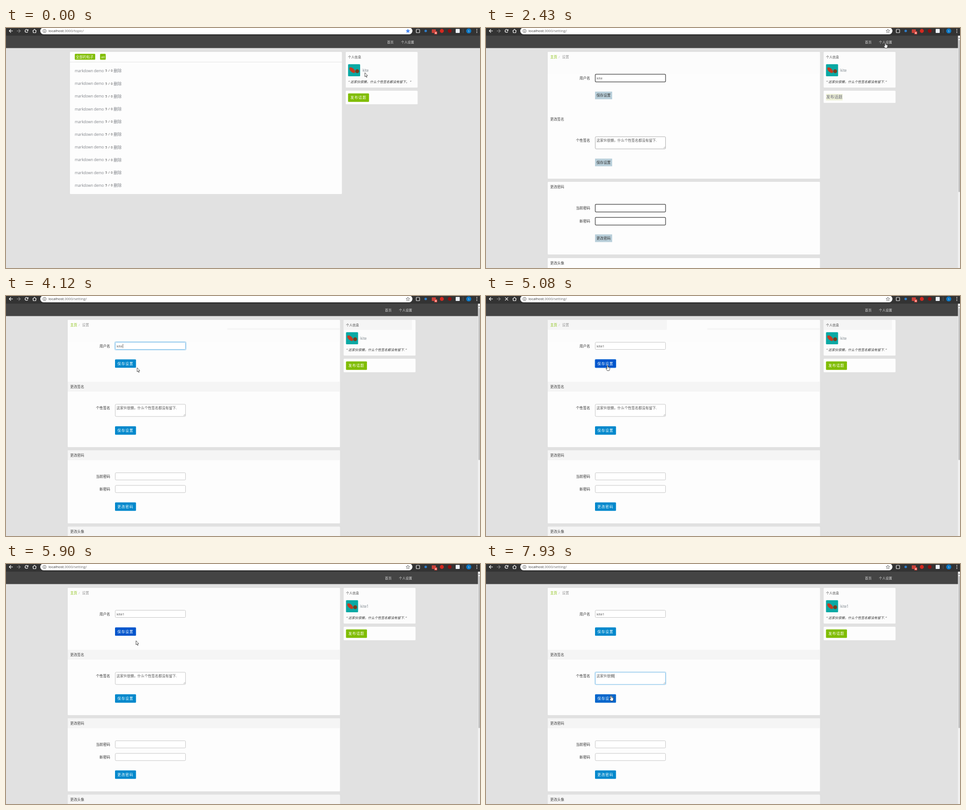
Animation of 1052x532 px, one loop 8000 ms. Source, as an HTML page with a canvas:

```html
<!DOCTYPE html>
<html lang="zh-CN">
<head>
<meta charset="utf-8">
<title>Forum settings</title>
<style>
html, body { margin: 0; width: 100%; height: 100%; overflow: hidden; background: #e1e1e1; }
canvas { display: block; width: 1052px; height: 532px; }
</style>
</head>
<body>
<canvas id="stage"></canvas>
<script>
const W = 1052, H = 532, LOOP = 8000;
const FONT = '"Open Sans", "Noto Sans", "Noto Sans CJK SC", "Noto Sans CJK", sans-serif';
const BLUE = '#0088cc', HOVER = '#0466cc', ACTIVE = '#0055cc', GREEN = '#80bd01';
const HEAD = '#f5f5f5', OFF = '#fcfcfc';
const SIGN = '这家伙很懒，什么个性签名都没有留下';

const canvas = document.getElementById('stage');
const dpr = window.devicePixelRatio || 1;
canvas.width = W * dpr;
canvas.height = H * dpr;
const g = canvas.getContext('2d');

// Pointer: start time, shape, position of the tip
const POINTER = [
  [0, 'arrow', 796.5, 99], [780, 'arrow', 814, 92], [930, 'arrow', 841, 78],
  [1050, 'arrow', 868, 65], [1200, 'arrow', 880, 53], [1320, 'hand', 884, 36],
  [1440, 'hand', 885, 31], [1720, 'hand', 886, 32], [2670, 'arrow', 868, 54],
  [2790, 'arrow', 800, 66], [2910, 'arrow', 741.5, 71.5], [3060, 'arrow', 640, 85],
  [3180, 'arrow', 500, 101], [3300, 'arrow', 405, 115], [3420, 'arrow', 306, 124],
  [3850, 'arrow', 291, 159], [4270, 'arrow', 288, 156], [4420, 'hand', 276, 150],
  [4540, 'hand', 269.5, 153], [5900, 'arrow', 288.5, 170], [6050, 'arrow', 289, 215],
  [6170, 'beam', 290, 259], [6450, 'beam', 340, 256], [6570, 'beam', 379, 250],
  [6720, 'beam', 379, 249], [6840, 'beam', 322, 249], [6990, 'beam', 309, 249],
  [7110, 'beam', 296, 249], [7230, 'beam', 280, 249], [7660, 'beam', 281, 268],
  [7780, 'hand', 277, 287], [7930, 'hand', 277.5, 291]
];

function rect(x, y, x2, y2, fill, r = 0) {
  g.fillStyle = fill;
  g.beginPath();
  g.roundRect(x, y, x2 - x, y2 - y, r);
  g.fill();
}

function frame(x, y, x2, y2, color, width = 1, r = 2) {
  g.strokeStyle = color;
  g.lineWidth = width;
  g.beginPath();
  g.roundRect(x + .5, y + .5, x2 - x - 1, y2 - y - 1, r);
  g.stroke();
}

function disc(x, y, r, fill) {
  g.fillStyle = fill;
  g.beginPath();
  g.arc(x, y, r, 0, 7);
  g.fill();
}

function line(points, color, width = 1, fill) {
  g.beginPath();
  points.forEach(([x, y], i) => i ? g.lineTo(x, y) : g.moveTo(x, y));
  if (fill) {
    g.closePath();
    g.fillStyle = fill;
    g.fill();
  }
  g.strokeStyle = color;
  g.lineWidth = width;
  g.stroke();
}

function text(s, x, y, size, color, { style = '', align = 'left', gap = 0 } = {}) {
  g.font = `${style} ${size}px ${FONT}`;
  g.letterSpacing = gap + 'px';
  g.textAlign = align;
  g.fillStyle = color;
  g.fillText(s, x, y);
}

function button(s, x, y, color) {
  rect(x, y, x + 46.5, y + 18.7, color, 1.5);
  text(s, x + 5.3, y + 12.4, 7.8, '#fff', { style: '500', gap: 1.1 });
}

function star(x, y, filled) {
  const pts = [];
  for (let i = 0; i <= 10; i++) {
    const r = i % 2 ? 1.9 : 4.4, a = i * Math.PI / 5 - Math.PI / 2;
    pts.push([x + r * Math.cos(a), y + r * Math.sin(a)]);
  }
  line(pts, filled ? '#4285f4' : '#555', .8, filled ? '#4285f4' : '#fff');
}

function browser(t) {
  rect(0, 0, W, 17, '#333');
  rect(76, -1, 902, 14, '#fff', 7.5);
  for (const [x, dir, color] of [[11, -1, '#fff'], [28, 1, '#888']]) {
    line([[x - 4 * dir, 6.5], [x + 4 * dir, 6.5]], color, 1.2);
    line([[x, 2.8], [x + 3.8 * dir, 6.5], [x, 10.2]], color, 1.2);
  }
  const loading = t >= 1720 && t < 2430 || t >= 4690 && t < 5330;
  if (loading) {
    line([[42.5, 3.2], [49, 9.8]], '#fff', 1.2);
    line([[49, 3.2], [42.5, 9.8]], '#fff', 1.2);
  } else {
    g.strokeStyle = '#fff';
    g.lineWidth = 1.3;
    g.beginPath();
    g.arc(45.6, 6.5, 3.2, .4, 5.4);
    g.stroke();
    line([[49.3, 2.8], [49.3, 6], [46.2, 6]], '#fff', .5, '#fff');
  }
  line([[59, 7], [63.3, 2.8], [67.6, 7]], '#fff', 1.2);
  line([[60.4, 6.5], [60.4, 10.5], [66.2, 10.5], [66.2, 6.5]], '#fff', 1.2);

  g.strokeStyle = '#555';
  g.lineWidth = .9;
  g.beginPath();
  g.arc(85.5, 6.6, 3.6, 0, 7);
  g.stroke();
  rect(85, 6, 86, 8.8, '#555');
  rect(85, 4.3, 86, 5.3, '#555');
  text('localhost', 94.3, 9.3, 8, '#333');
  const hostEnd = 94.3 + g.measureText('localhost').width;
  text(':3000/' + (t < 2030 ? 'topic/' : 'setting/'), hostEnd, 9.3, 8, '#6a6a6a');
  star(892, 6.8, t < 2030);

  frame(910, 2.5, 918.5, 11, '#eee', 1.2, 1);
  disc(931.5, 6.5, 2.8, '#2f7bc4');
  rect(945, 3, 954, 11, '#c8413a', .5);
  rect(950.5, 7.5, 957, 14, '#e04b42', 1);
  text('4', 953.8, 13.2, 6, '#fff', { style: 'bold', align: 'center' });
  disc(967.3, 6.5, 4.4, '#d5281f');
  disc(984.8, 6.5, 4.2, '#8b1010');
  rect(998, 2, 1007, 11, '#edf2fb', 1);
  rect(1014, 2, 1014.8, 11, '#666');
  disc(1027, 6.5, 5.6, '#0c78c6');
  text('S', 1027, 8.5, 5, '#fff', { align: 'center' });
  for (const y of [3.3, 6.6, 9.9]) disc(1045, y, .95, '#fff');
}

function nav(dx, hover) {
  rect(0, 16.5, W, 44.5, '#444');
  text('首页', 845.7 + dx, 33.6, 7.3, '#ddd');
  text('个人设置', 876.7 + dx, 33.6, 7.3, hover ? '#fff' : '#ddd');
}

function sidebar(dx, name, ending, raw) {
  g.save();
  g.translate(dx, 0);
  rect(754, 53, 913.5, 132, OFF, 1.5);
  rect(754, 139, 913.5, raw ? 166 : 169, '#fdfdfd', 1.5);
  g.restore();
  return () => {
    g.save();
    g.translate(dx, 0);
    text('个人信息', 759, 66.6, 7.3, '#444');
    rect(759.2, 80.3, 786, 107, '#0ba9a4', 1.5);
    g.fillStyle = '#c63a20';
    g.beginPath();
    g.ellipse(768.5, 93.5, 8, 4.2, .75, 0, 7);
    g.fill();
    disc(779.5, 95.8, 4.3, '#73401f');
    text(name, 791.2, 96.8, 8.1, '#778087');
    text(`“ ${SIGN}${ending} ”`, 759.8, 122.4, 7.25, '#333', { style: 'italic' });
    if (raw) {
      rect(759.3, 146, 796, 160.5, '#eef1d8');
      text('发布话题', 759.5, 156.4, 9, '#667');
    } else {
      button('发布话题', 759.2, 145, GREEN);
    }
    g.restore();
  };
}

function topicPage(t) {
  nav(0, t >= 1320);
  rect(142, 53, 745.5, 368, '#fdfdfd', 1.5);
  rect(142, 75, 745.5, 76, '#e2e2e2');
  rect(152.7, 57.3, 198, 70.3, GREEN, 1.5);
  rect(208.8, 57.3, 221.3, 70.3, GREEN, 1.5);
  text('全部的帖子', 155, 66.9, 7.8, '#fff');
  text('all', 211, 66.7, 7.8, '#fff');
  for (let i = 0; i < 10; i++) {
    const y = 98 + i * 28.2;
    text('markdown demo', 152.8, y, 8.1, '#7f8288');
    text('5 / 0', 220.3, y - .7, 7.6, '#444', { gap: .3 });
    text('删除', 238.8, y + .3, 9, '#7f8288');
  }
  const details = sidebar(0, 'kite', '。', false);
  if (t >= 1050) rect(837, 65, 886.5, 75, HEAD);
  if (t >= 1200) rect(867, 53, 886.5, 75, HEAD);
  details();
}

function field(y, raw, focus, glow) {
  if (glow) frame(241, y - 1, 400, y + 18, '#c5e2f5', 2);
  rect(242, y, 399, y + (raw ? 18 : 17), '#fff', 2);
  frame(242, y, 399, y + (raw ? 18 : 17), raw ? '#555' : focus ? '#6fb6e6' : '#c4c4c4', raw ? 1.5 : 1);
}

function signature(t, raw) {
  const y = raw ? 240.5 : 239.5, base = y + 11.3;
  const focus = t >= 6720;
  if (t >= 6840) frame(241, y - 1, 400, y + 28.5, '#d7ebf8', 1.5);
  rect(242, y, 399, y + 28, '#fff', 2);
  frame(242, y, 399, y + 28, focus ? '#6fb6e6' : raw ? '#aaa' : '#c4c4c4');
  line([[394, y + 26], [397.5, y + 22.5]], '#888', .7);
  line([[396, y + 26], [397.5, y + 24.5]], '#888', .7);
  const s = t < 7660 ? SIGN + '.' : SIGN.slice(0, 5);
  text(s, 245.3, base, 7.75, '#555');
  const width = g.measureText(s).width;
  if (t >= 6840 && t < 7660) {
    const left = t < 6990 ? 323 : t < 7110 ? 307.3 : t < 7230 ? 299.6 : 284.1;
    const right = 245.3 + width;
    g.save();
    g.beginPath();
    g.rect(left, y + 4, right - left, 10);
    g.clip();
    rect(left, y + 4, right, y + 14, '#3390ff');
    text(s, 245.3, base, 7.75, '#fff');
    g.restore();
  } else if (focus) {
    rect(245.3 + width, y + 4, 246 + width, y + 13.5, '#333');
  }
}

function saveColor(t) {
  if (t >= 4420 && t < 4690) return HOVER;
  if (t >= 4690 && t < 6050) return ACTIVE;
  return t < 6170 && t >= 6050 ? HOVER : BLUE;
}

function settingsButton(s, y, raw, color) {
  if (raw) {
    rect(242, y, 280, y + 17, '#b9cfda');
    text(s, 245.3, y + 11.2, 7.8, '#333');
  } else {
    button(s, 242, y, color);
  }
}

function settingsPage(t) {
  const raw = t < 2550 || t >= 5330 && t < 5600;
  const saved = t >= 5330;
  const label = (s, y) => text(s, 231, y, 7.8, '#333', { align: 'right' });
  const title = (s, y) => text(s, 142.4, y, 7.8, '#444');
  const d = raw ? -1 : 0;

  nav(-4.6, false);
  rect(1047.5, 17, W, H, '#f1f1f1');
  rect(1048.5, 27, 1052, 363.5, '#c1c1c1');
  line([[1048.8, 23.5], [1050, 21.8], [1051.2, 23.5]], '#666', .5, '#666');

  rect(137, 53, 741.2, 335 + d, '#fdfdfd', 1.5);
  rect(137, 53, 741.2, 101, OFF, 1.5);
  rect(137, 342 + d, 741.2, 504 + 2 * d, '#fdfdfd', 1.5);
  rect(137, 511.5 + 1.5 * d, 741.2, H + 5, '#fdfdfd', 1.5);
  if (!raw) {
    rect(137, 190, 741.2, 212, HEAD);
    rect(137, 342, 741.2, 364, HEAD, 1.5);
    rect(137, 511.5, 741.2, H, HEAD, 1.5);
  }
  if (t >= 3060 && !saved) rect(491, 71.5, 741.2, 75, HEAD);
  if (t >= 4690 && !saved) rect(137, 53, 401.5, 75, HEAD, 1.5);

  text('主页', 142.4, 66.8, 7.8, GREEN);
  text('/', 161, 66.5, 7.8, '#bbb');
  text('设置', 168.8, 66.8, 7.8, '#999');

  label('用户名', 113.7);
  const focus = t >= 3850 && t < 4690;
  field(102, raw, focus, focus && t >= 4000);
  const name = t < 4270 ? 'kite' : 'kite1';
  text(name, 245.5, 113.5, 7.75, '#555');
  if (focus) rect(246 + g.measureText(name).width, 106, 246.7 + g.measureText(name).width, 115.5, '#333');
  settingsButton('保存设置', raw ? 141 : 140.4, raw, saveColor(t));
  if (t >= 4690 && t < 5330) frame(241.5, 140, 289, 159.5, '#3d86dd', 1, 1.5);

  title('更改签名', 204 - d);
  label('个性签名', 251 - d);
  signature(t, raw);
  settingsButton('保存设置', raw ? 289.5 : 288.7, raw, t >= 7930 ? HOVER : BLUE);

  title('更改密码', 356 + d);
  label('当前密码', 402.8 + d);
  field(391.3 + d, raw);
  label('新密码', 430.5);
  field(419.3, raw);
  settingsButton('更改密码', raw ? 457.5 : 457.6, raw, BLUE);
  title('更改头像', 525 + 1.5 * d);

  const details = sidebar(-4.6, saved ? 'kite1' : 'kite', '.', raw);
  if (t >= 2550 && !saved) rect(749.5, 53, 901, 75, HEAD);
  details();
}

function pointer(t) {
  const [, kind, x, y] = POINTER.findLast(k => k[0] <= t);
  g.save();
  g.translate(x, y);
  g.lineJoin = 'round';
  if (kind === 'arrow') {
    line([[0, 0], [0, 9], [2.1, 7.2], [3.4, 10.4], [4.8, 9.8], [3.5, 6.8], [6, 6.5]], '#222', .8, '#fff');
  } else if (kind === 'beam') {
    line([[-1.8, -4.8], [1.8, -4.8]], '#333', .8);
    line([[0, -4.8], [0, 4.8]], '#333', .8);
    line([[-1.8, 4.8], [1.8, 4.8]], '#333', .8);
  } else {
    line([[-.9, .9], [0, .2], [.9, .9], [1, 4.3], [4.6, 5.2], [5.4, 6.2], [5.2, 9.3],
      [4, 12.5], [-.5, 12.5], [-3.3, 8], [-2.7, 7], [-.9, 8.2]], '#222', .8, '#fff');
    line([[2.2, 5], [2.2, 7]], '#444', .5);
    line([[3.7, 5.4], [3.7, 7.2]], '#444', .5);
  }
  g.restore();
}

function draw(now) {
  const t = now % LOOP;
  g.setTransform(dpr, 0, 0, dpr, 0, 0);
  rect(0, 0, W, H, '#e1e1e1');
  if (t < 2430) topicPage(t);
  else settingsPage(t);
  browser(t);
  pointer(t);
}

const start = performance.now();
function tick() {
  draw(performance.now() - start);
  requestAnimationFrame(tick);
}
tick();
</script>
</body>
</html>
```
